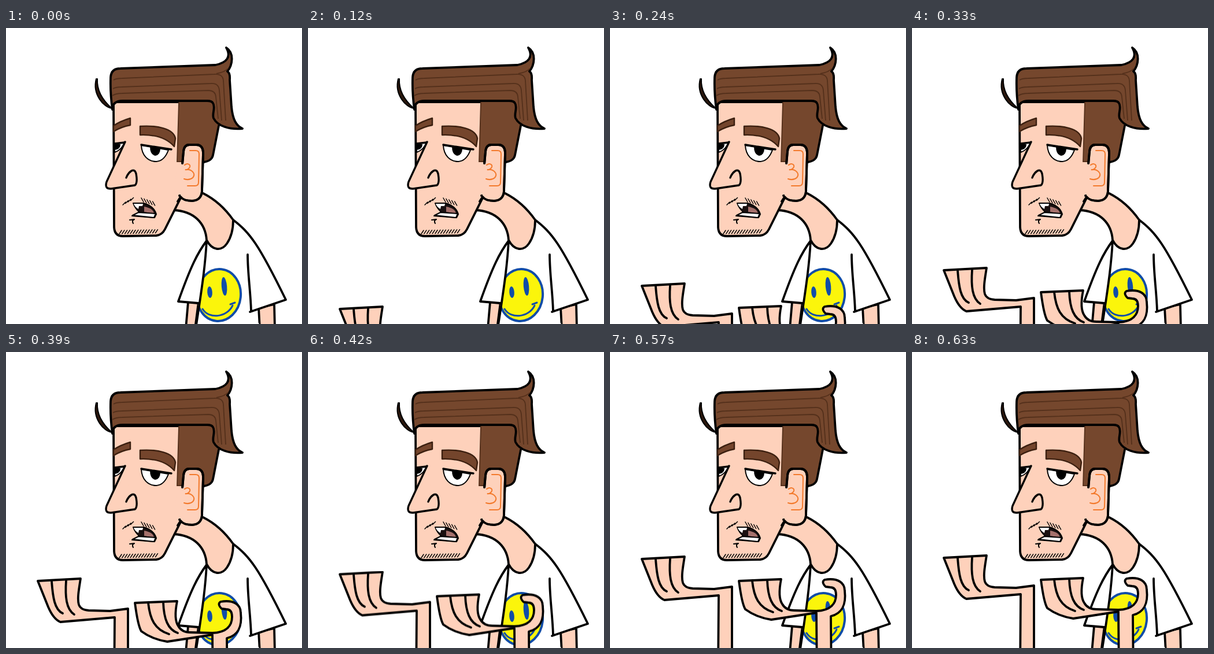
These frames come from a looping animation (512 by 512 pixels, 1.83 s). An HTML page:

```html
<!DOCTYPE html>
<html lang="en">
<head>
<meta charset="utf-8">
<title>Shrug</title>
<style>
  html, body { margin: 0; width: 100%; height: 100%; overflow: hidden; background: #fff; }
  svg { display: block; width: 100vw; height: 100vh; }
  .line { fill: none; stroke: #000; stroke-width: 3.8; stroke-linecap: round; stroke-linejoin: round; }
  .skin { fill: #fed1bb; }
  .white { fill: #fff; }
  .hair { fill: #75472d; }
  .thin { stroke-width: 2; }
  .fine { stroke-width: 1.5; }
  .strand { fill: none; stroke: #54301b; stroke-width: 1.8; }
  .brow { fill: #74452c; stroke: #3c2010; stroke-width: 2.4; stroke-linejoin: round; }
  .ear { fill: none; stroke: #f37a2c; stroke-width: 2; stroke-linecap: round; }
  .blue { fill: none; stroke: #114da8; stroke-width: 3.8; stroke-linecap: round; }
</style>
</head>
<body>
<svg viewBox="0 0 512 512">
  <defs>
    <clipPath id="torso"><path d="M347 368Q343 430 330 512H440V368Z"/></clipPath>
  </defs>

  <!-- arms below the sleeves -->
  <path class="line skin" d="M315 474L311 520H327L333 474Z"/>
  <path class="line skin" d="M437 484L439 520H465L464 478Z"/>

  <!-- shirt -->
  <path class="white" d="M347 368L393 332L424 360L484 470L422 491L438 512H329L333 476L298 473Z"/>
  <g clip-path="url(#torso)">
    <ellipse cx="368" cy="462" rx="38" ry="45" fill="#fbf50b" class="face" stroke="#114da8" stroke-width="4" transform="rotate(6 368 462)"/>
    <ellipse cx="352.500" cy="457" rx="4.300" ry="10" fill="#114da8" transform="rotate(-4 352 457)"/>
    <ellipse cx="377.500" cy="447" rx="4.700" ry="16" fill="#114da8" transform="rotate(-5 377 447)"/>
    <path class="blue" style="stroke-width:3" d="M340 486C351 504 382 501 392 480M388 478L396 475"/>
  </g>
  <path class="line" d="M347 368C332 388 320 411 298 473L333 476M347 368C345 405 341 437 329 514"/>
  <path class="line" d="M393 332C422 354 437 374 484 470L422 491M418 392C418 426 423 454 424 490"/>

  <!-- neck -->
  <path class="skin" d="M288 315C325 317 345 337 347 367C357 386 373 386 382 373C391 360 393 346 393 332C381 315 365 298 341 286L300 285Z"/>
  <path class="line" d="M290 315C325 317 345 337 347 367C357 386 373 386 382 373C391 360 393 346 393 332C381 315 365 298 341 286"/>

  <!-- head -->
  <path class="line skin" d="M186 128L187 345Q188 360 202 360L260 359Q270 358 275 348L302 294L340 240V128Z"/>
  <path class="hair" d="M299 126H358L368 169L358 222Q355 230 342 232L296 231Z"/>
  <path class="strand" d="M299 128L296 231H306"/>
  <path class="line" d="M368 169L358 220Q356 230 342 232"/>
  <path class="line skin" d="M302 292Q307 299 322 299Q338 298 339 282L341 217Q341 202 329 202H317Q308 202 307 214L304 250L300 290" stroke="none"/>
  <path class="skin" d="M296 233H307V288H299L290 300Z"/>
  <path class="line" d="M297 300L302 292Q307 299 322 299Q338 298 339 282L341 217Q341 202 329 202H317Q308 202 307 214L305 234"/>
  <path class="ear" d="M318 212H328Q334 212 334 218L333 267Q333 273 327 273H314M309 237C315 232 322 238 316 243Q313 246 310 245C321 243 329 252 323 259Q317 264 308 261"/>

  <!-- hair -->
  <path class="line hair" d="M184 141Q180 112 181 85Q182 70 198 70L362 64C382 60 390 50 381 34C395 43 392 64 383 75Q388 78 387 90L390 136C392 158 398 169 409 174C387 176 366 170 359 156C356 148 363 137 358 130Q356 126 348 126H202Q184 126 184 141Z"/>
  <path class="strand" d="M186 90Q191 87 201 87L360 80Q375 79 376 91L380 160"/>
  <path class="strand" d="M185 105Q190 102 200 102L354 96Q368 95 369 108L373 160"/>
  <path class="strand" d="M184 117Q190 113 201 113L350 108Q362 108 363 119L367 157"/>
  <path class="strand" d="M364 79Q379 76 384 70"/>
  <path d="M158 88C157 106 166 124 183 139C169 137 149 115 156 88Z" fill="#2c170c" class="line thin" style="fill:#2c170c"/>

  <!-- brows and eyes -->
  <path class="brow" d="M186 179V169Q198 161 215 156V168Q199 171 186 179Z"/>
  <path class="brow" d="M232 170C261 168 290 174 293 191L291 205C278 190 258 184 232 185Z"/>
  <path class="line white thin" d="M187 200L205 198Q200 211 188 215Z"/>
  <path d="M188 201H198Q198 210 188 211Z"/>
  <path class="line white thin" d="M234 203C235 220 245 231 260 231Q274 230 281 211Z"/>
  <path d="M249 205L267 208Q267 220 258 221Q249 219 249 205Z"/>
  <path class="line" style="stroke-width:3.4" d="M234 202L286 210M188 200L205 198"/>

  <!-- nose -->
  <path class="skin" d="M206 197L173 267Q170 279 182 279L223 272Q227 270 226 261L222 247H214Z"/>
  <path class="line" style="stroke-width:3.4" d="M206 197L174 266Q170 279 182 278L223 272Q228 268 225 252Q223 244 217 247Q211 251 208 259"/>

  <!-- mouth -->
  <path class="line thin" style="fill:#191010" d="M220 303L238 303Q256 308 260 322L257 328L218 325L231 319Q223 312 220 303Z"/>
  <path class="white" d="M221 304L237 304L236 308L230 308L229 313Q223 310 221 304Z"/>
  <path d="M239 309Q255 312 256 321L239 318Z" fill="#a5716c"/>
  <path class="skin" d="M218 311L228 317L218 322Z"/>
  <path class="line white thin" d="M219 324L229 319L259 321L256 328Z"/>
  <path class="line thin" d="M214 332L222 331Q217 333 220 338"/>
  <g id="stubble" class="line fine"></g>

  <!-- raised arms -->
  <g id="arms">
    <path class="line skin" d="M55 356L129 352C126 371 123 387 126 397Q129 406 143 407L180 408L211 404V680H186L188 419L94 427Q82 422 73 401Z"/>
    <path class="line" d="M79 357C81 384 84 406 98 412M104 355C102 383 104 405 118 414"/>
    <path class="line skin" d="M223 394L296 391C292 411 292 425 298 434Q304 445 319 445L357 446C382 445 391 433 391 418Q391 405 381 405L373 404Q365 396 371 392C394 388 406 397 406 411C409 436 400 451 382 455L384 680H359L357 449L279 461Q253 457 234 443Q228 433 223 394Z"/>
    <path class="line" d="M246 394C249 422 257 440 282 448M272 393C273 422 280 440 297 446"/>
  </g>
</svg>
<script>
  const LOOP = 1830;

  // [time in ms, drop of the arms in px]
  const steps = [
    [0, 165], [60, 146], [120, 130], [180, 114], [210, 101], [240, 90],
    [270, 81], [300, 72], [330, 63], [360, 51], [390, 40], [420, 28.500],
    [480, 18], [510, 11.500], [540, 6], [570, 2], [630, 0], [LOOP, 0]
  ];

  const frames = steps.map(([time, drop]) => ({
    offset: time / LOOP,
    transform: `translateY(${drop}px)`,
    easing: 'step-end'
  }));
  document.getElementById('arms').animate(frames, { duration: LOOP, iterations: Infinity });

  // A row of short slanted hairs.
  function hairs(count, x, y, gap, rise, dx, dy) {
    let d = '';
    for (let i = 0; i < count; i++) {
      d += `M${x + i * gap} ${y + i * rise}l${dx} ${dy}`;
    }
    const path = document.createElementNS('http://www.w3.org/2000/svg', 'path');
    path.setAttribute('d', d);
    document.getElementById('stubble').append(path);
  }

  hairs(14, 196, 356, 4.800, -0.100, 4, -6);
  hairs(4, 202, 306, 4.500, -2.500, 5, -5);
  hairs(5, 234, 294, 4.900, 1.500, 4, 7);
</script>
</body>
</html>
```
